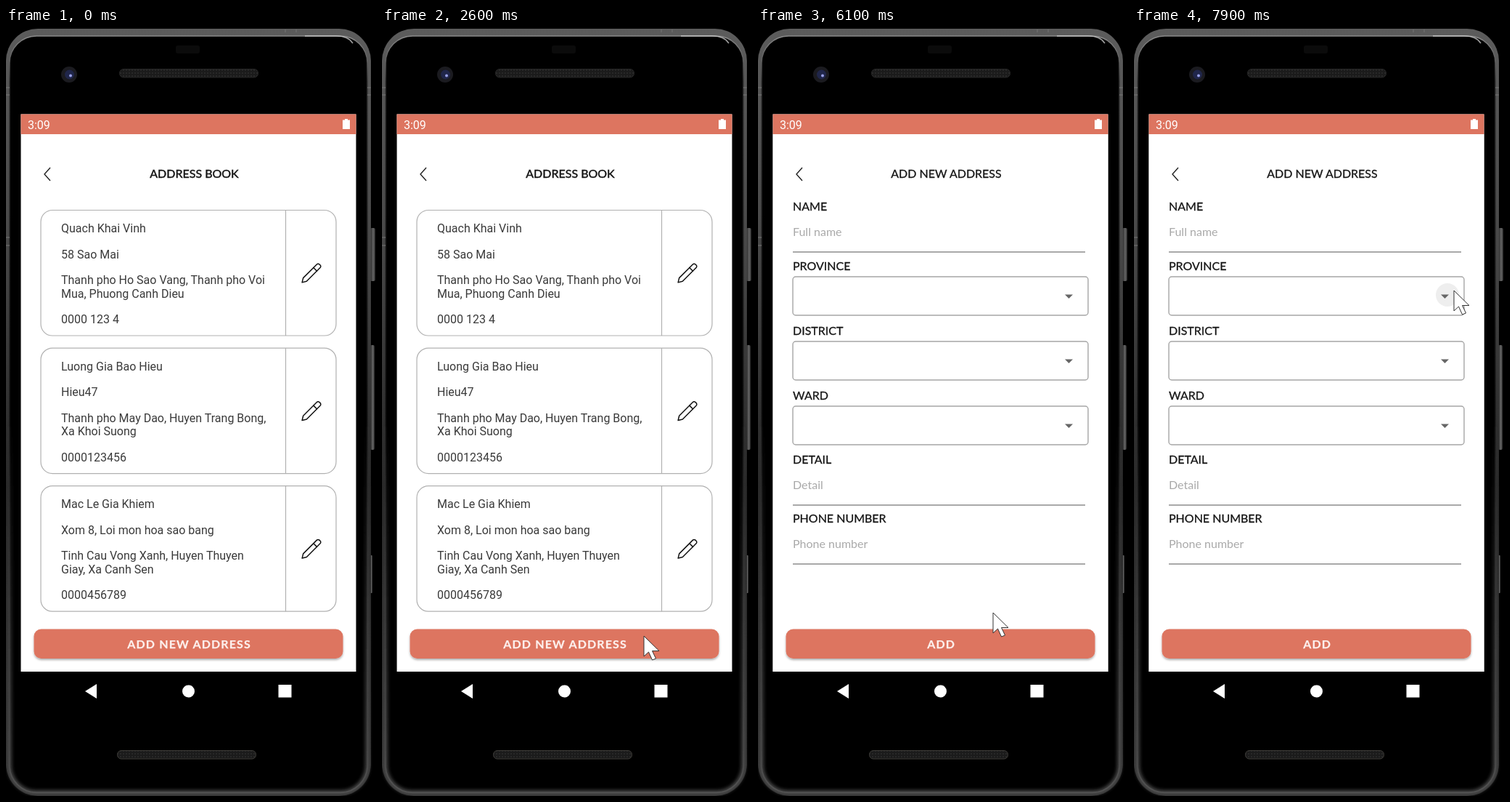
Recreate the animation shown at these times as an HTML page. Size 510 by 1056 pixels, loop 8000 ms.

```html
<!DOCTYPE html>
<html lang="en">
<head>
<meta charset="utf-8">
<title>Address book</title>
<style>
  html, body { margin: 0; width: 100%; height: 100%; overflow: hidden; background: #000; }
  svg { display: block; width: 100vw; height: 100vh; }
  svg * { animation: 8s linear infinite; }

  .body { font: 16px Roboto, sans-serif; fill: #3a3a3a; }
  .label { font: 16px Lato, sans-serif; fill: #151515; stroke: #151515; stroke-width: .3px; }
  .title { text-anchor: middle; }
  .strong { stroke-width: .45px; }
  .hint { font: 16px Lato, sans-serif; fill: #a9a9a9; }
  .cta { font: bold 16px Lato, sans-serif; letter-spacing: 1.15px; fill: #fdf0ed; stroke: #fdf0ed; stroke-width: .25px; text-anchor: middle; }
  .box { fill: none; stroke: #b1b1b1; stroke-width: 1.2; }
  .select { fill: none; stroke: #a6a6a6; stroke-width: 1.4; }
  .pencil { fill: none; stroke: #111; stroke-width: 1.5; stroke-linejoin: round; stroke-linecap: round; }

  #cards { animation-name: scroll; }
  #thumb { animation-name: thumb; }
  #form { animation-name: form; animation-timing-function: step-end; }
  #dim { animation-name: dim; }
  #hover { animation-name: hover; }
  #spinner { animation-name: spinner; animation-timing-function: step-end; }
  .cube { fill: #e2765f; animation-name: wander; animation-timing-function: ease-in-out; }
  #cursor { animation-name: cursor; }
  #arrow { animation-name: arrow; animation-timing-function: step-end; }

  @keyframes scroll {
    0%, 1.5% { transform: translateY(0); }
    11.25%, 12.5% { transform: translateY(189.6px); }
    17.5% { transform: translateY(86px); }
    21.25%, 100% { transform: translateY(0); }
  }
  @keyframes thumb {
    0%, 1.5% { transform: translateY(64px); opacity: 0; }
    3% { opacity: 1; }
    11.25%, 12.5% { transform: translateY(-76px); }
    17.5% { transform: translateY(0); }
    21.25% { transform: translateY(64px); }
    26% { opacity: 1; }
    29%, 100% { transform: translateY(64px); opacity: 0; }
  }
  @keyframes cursor {
    0%, 1.5% { transform: translate(300px, 407px); }
    11.25%, 12.5% { transform: translate(297px, 597px); }
    17.5% { transform: translate(293px, 493px); }
    21.25% { transform: translate(296px, 407px); }
    24% { transform: translate(296px, 407px); animation-timing-function: ease-in-out; }
    32%, 34% { transform: translate(361px, 836px); }
    43%, 45% { transform: translate(345px, 844px); }
    56%, 58% { transform: translate(358px, 834px); animation-timing-function: ease-in-out; }
    67%, 69.5% { transform: translate(324px, 730px); }
    73.5% { transform: translate(324px, 804px); }
    91.25% { transform: translate(324px, 804px); animation-timing-function: ease-in-out; }
    97.5%, 100% { transform: translate(441px, 361px); }
  }
  @keyframes arrow {
    0% { visibility: hidden; }
    1.25%, 100% { visibility: visible; }
  }
  @keyframes form {
    0% { visibility: hidden; }
    76.25%, 100% { visibility: visible; }
  }
  @keyframes dim {
    0%, 77% { opacity: 0; }
    78.75%, 87.5% { opacity: .6; }
    88.75%, 100% { opacity: 0; }
  }
  @keyframes spinner {
    0% { visibility: hidden; }
    78.25% { visibility: visible; }
    88%, 100% { visibility: hidden; }
  }
  @keyframes wander {
    0%, 78.375% { transform: translate(-32px, -32px) rotate(0) scale(1); }
    84% { transform: translate(32px, -32px) rotate(-90deg) scale(.5); }
    89.625%, 100% { transform: translate(32px, 32px) rotate(-180deg) scale(1); }
  }
  @keyframes hover {
    0%, 96.5% { opacity: 0; }
    98%, 100% { opacity: 1; }
  }
</style>
</head>
<body>
<svg viewBox="0 0 510 1056">
  <defs>
    <linearGradient id="rim" x2="0" y2="1">
      <stop offset="0" stop-color="#5c5c5c"/>
      <stop offset=".28" stop-color="#484848"/>
      <stop offset=".6" stop-color="#262626"/>
      <stop offset="1" stop-color="#2e2e2e"/>
    </linearGradient>
    <linearGradient id="edge" x2="0" y2="1">
      <stop offset="0" stop-color="#8a8a8a"/>
      <stop offset=".06" stop-color="#333"/>
      <stop offset=".5" stop-color="#161616"/>
      <stop offset=".95" stop-color="#333"/>
      <stop offset="1" stop-color="#555"/>
    </linearGradient>
    <linearGradient id="glow" x2="0" y2="1">
      <stop offset=".5" stop-color="#555" stop-opacity="0"/>
      <stop offset="1" stop-color="#555"/>
    </linearGradient>
    <linearGradient id="key">
      <stop offset="0" stop-color="#222"/>
      <stop offset=".6" stop-color="#666"/>
      <stop offset="1" stop-color="#2c2c2c"/>
    </linearGradient>
    <pattern id="mesh" width="4" height="4" patternUnits="userSpaceOnUse">
      <rect width="4" height="4" fill="#1b1b1b"/>
      <circle cx="2" cy="2" r="1" fill="#2c2c2c"/>
    </pattern>
    <filter id="soft"><feGaussianBlur stdDeviation="2.5"/></filter>
    <filter id="shadow" x="-5%" y="-20%" width="110%" height="160%">
      <feDropShadow dx="0" dy="2" stdDeviation="1.6" flood-opacity=".32"/>
    </filter>
    <clipPath id="view"><rect x="40" y="238" width="424" height="566"/></clipPath>
    <g id="frame">
      <rect class="box" x="48" width="407" height="172.5" rx="16"/>
      <path class="box" d="M385.5 0V172.5"/>
      <g class="pencil" transform="translate(420.5 87) rotate(-45)">
        <path d="M-17.5 0L-12 -3.3H14.5a2.5 2.5 0 0 1 2.5 2.5V.8a2.5 2.5 0 0 1 -2.5 2.5H-12Z"/>
        <path d="M8 -3.3V3.3"/>
      </g>
    </g>
    <rect id="button" x="38.5" y="826.5" width="426" height="40.5" rx="10" fill="#dd7560" filter="url(#shadow)"/>
    <path id="back" d="M61 192L53 201 61 210" fill="none" stroke="#222" stroke-width="1.4"/>
  </defs>

  <!-- phone -->
  <g id="phone">
    <rect width="510" height="1056"/>
    <g fill="url(#key)">
      <rect x="502" y="275" width="7" height="73" rx="2"/>
      <rect x="502" y="436" width="6" height="144" rx="2"/>
      <rect x="502" y="725" width="3" height="52" rx="1"/>
    </g>
    <rect x="0" y="1" width="503" height="1055" rx="44" fill="url(#rim)"/>
    <rect x="5" y="11" width="493" height="1040" rx="37" stroke="url(#edge)" stroke-width="1.5"/>
    <rect x="5" y="11" width="493" height="1040" rx="37" fill="none" stroke="url(#glow)" stroke-width="5" filter="url(#soft)"/>
    <path d="M412 11H455Q472 11 478 21" fill="none" stroke="#ddd" stroke-width="1.5" opacity=".7"/>
    <path d="M0 82H5M0 92H5M498 82H503M498 92H503M0 288H5M0 299H5M385 2V6M400 2V6" stroke="#777"/>
    <rect x="234" y="24" width="33" height="11" rx="3" fill="#0b0b0b"/>
    <circle cx="87" cy="64" r="11" fill="#1b1b20"/>
    <circle cx="87.5" cy="64" r="6.5" fill="#20264a"/>
    <circle cx="89" cy="65.5" r="2" fill="#98a0e6"/>
    <rect x="156.5" y="56.5" width="191" height="11.5" rx="5.5" fill="url(#mesh)" stroke="#272727"/>
    <rect x="153.5" y="993.5" width="191" height="11.5" rx="5.5" fill="url(#mesh)" stroke="#3d3b37"/>
    <g fill="#fff">
      <path d="M109 912L125 902V922Z"/>
      <circle cx="251.5" cy="912" r="8.5"/>
      <rect x="375.5" y="903" width="18" height="17.5"/>
    </g>
  </g>

  <!-- screen -->
  <rect x="20.5" y="118.5" width="462" height="766.5" fill="#fff"/>
  <rect x="20.5" y="118.5" width="462" height="27.5" fill="#dd7560"/>

  <g id="list">
    <use href="#back"/>
    <text class="label title strong" x="259.5" y="206">ADDRESS BOOK</text>
    <g clip-path="url(#view)">
      <g id="cards"></g>
      <rect id="thumb" x="451" y="314" width="4.5" height="420" fill="#a6a6a6"/>
    </g>
    <use href="#button"/>
    <text class="cta" x="252.6" y="852.5">ADD NEW ADDRESS</text>
  </g>

  <g id="form">
    <rect x="20.5" y="146" width="462" height="739" fill="#fff"/>
    <use href="#back"/>
    <text class="label title" x="259.5" y="206">ADD NEW ADDRESS</text>
    <circle id="hover" cx="432" cy="367" r="16" fill="#eee"/>
    <g id="fields"></g>
    <use href="#button"/>
    <text class="cta" x="252.6" y="852.5">ADD</text>
  </g>

  <rect id="dim" x="20.5" y="118.5" width="462" height="766.5"/>
  <text x="30" y="138.5" style="font: 16px Roboto, sans-serif" fill="#fff">3:09</text>
  <path d="M467 125H471V126.5H474V139H464V126.5H467Z" fill="#fff"/>

  <g id="spinner">
    <g transform="translate(253 515)"><rect class="cube" x="-10.5" y="-10.5" width="21" height="21"/></g>
    <g transform="translate(253 515) rotate(180)"><rect class="cube" x="-10.5" y="-10.5" width="21" height="21"/></g>
  </g>

  <g id="cursor">
    <path id="arrow" d="M0 0V28L6.5 22 11.5 33 16.5 31 11.5 20.5H21Z" fill="#fff" stroke="#333" stroke-linejoin="round"/>
  </g>
</svg>
<script>
  const byId = id => document.getElementById(id);
  const text = (cls, x, y, s) => `<text class="${cls}" x="${x}" y="${y}">${s}</text>`;

  const people = [
    ['Truong Bao Khiem', '47 Mo Vang', 'Tinh Nang Mai, Thanh pho Son Lua,', 'Phuong Gio Lanh', '000 123 45'],
    ['Quach Khai Vinh', '58 Sao Mai', 'Thanh pho Ho Sao Vang, Thanh pho Voi', 'Mua, Phuong Canh Dieu', '0000 123 4'],
    ['Luong Gia Bao Hieu', 'Hieu47', 'Thanh pho May Dao, Huyen Trang Bong,', 'Xa Khoi Suong', '0000123456'],
    ['Mac Le Gia Khiem', 'Xom 8, Loi mon hoa sao bang', 'Tinh Cau Vong Xanh, Huyen Thuyen', 'Giay, Xa Canh Sen', '0000456789']
  ];
  const baselines = [30.5, 66, 101.5, 120, 155.5];
  byId('cards').innerHTML = people.map((lines, i) =>
    `<g transform="translate(0 ${250.5 + 189.6 * (i - 1)})"><use href="#frame"/>` +
    lines.map((s, k) => text('body', 76, baselines[k], s)).join('') + '</g>').join('');

  const input = (name, hint, y) => text('label', 48, y, name) + text('hint', 48, y + 35, hint) +
    `<path d="M48 ${y + 57}H451" stroke="#8c8c8c" stroke-width="1.3"/>`;
  const select = (name, y) => text('label', 48, y, name) +
    `<rect class="select" x="48" y="${y + 9.5}" width="407" height="53" rx="4"/>` +
    `<path d="M423 ${y + 34}h11l-5.5 5.5z" fill="#666"/>`;
  byId('fields').innerHTML =
    input('NAME', 'Full name', 251) +
    select('PROVINCE', 332.5) + select('DISTRICT', 421.5) + select('WARD', 510.5) +
    input('DETAIL', 'Detail', 599) + input('PHONE NUMBER', 'Phone number', 680);
</script>
</body>
</html>
```
